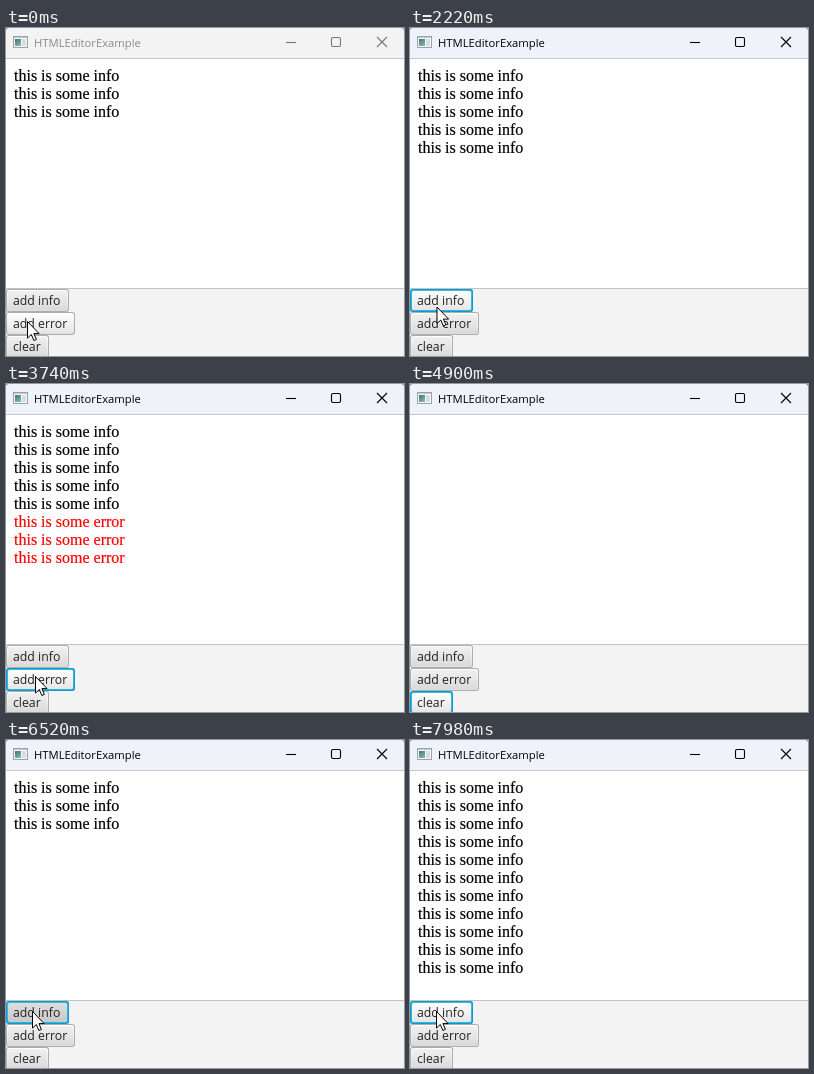
An HTML page for the animation above (8000 ms loop, 398 by 328 pixels).

```html
<!DOCTYPE html>
<html lang="en">
<head>
<meta charset="utf-8">
<title>HTMLEditorExample</title>
<style>
html, body { margin: 0; width: 100%; height: 100%; overflow: hidden; background: #f3f3f3; }
svg { display: block; }
.ui { font-family: "Open Sans", "Noto Sans", sans-serif; }
.page { font: 16px "Liberation Serif", "Times New Roman", serif; stroke-width: 0.2; }
</style>
</head>
<body>
<svg width="398" height="328" viewBox="0 0 398 328">
  <defs>
    <linearGradient id="normal" x2="0" y2="1"><stop stop-color="#f0f0f0"/><stop offset="1" stop-color="#dadada"/></linearGradient>
    <linearGradient id="hover" x2="0" y2="1"><stop stop-color="#fdfdfd"/><stop offset="1" stop-color="#e6e6e6"/></linearGradient>
    <linearGradient id="armed" x2="0" y2="1"><stop stop-color="#dedede"/><stop offset="1" stop-color="#c8c8c8"/></linearGradient>
    <linearGradient id="rim" x2="0" y2="1"><stop stop-color="#fff"/><stop offset="1" stop-color="#dedede"/></linearGradient>
    <linearGradient id="pane" x2="0.6" y2="1"><stop stop-color="#3f6f86"/><stop offset="1" stop-color="#7fb5a4"/></linearGradient>
  </defs>
  <rect width="398" height="40" fill="#6f78b4"/>
  <path id="bar" d="M0 31V3Q0 0 3 0H395Q398 0 398 3V31Z"/>
  <g>
    <rect x="7.5" y="8.5" width="14" height="11" fill="#f8f9fa" stroke="#9aa2a8"/>
    <path d="M8 9.5H21" stroke="#c3c9cd"/>
    <rect x="9" y="11" width="6" height="7" fill="url(#pane)"/>
    <rect x="16" y="11" width="4" height="7" fill="#d5dee2"/>
  </g>
  <text id="title" class="ui" x="28" y="19" font-size="11.25">HTMLEditorExample</text>
  <g id="controls" fill="none" stroke-width="1.1">
    <path d="M280 14.5H290"/>
    <rect x="325.5" y="9.5" width="9" height="9" rx="1.5"/>
    <path d="M371 9L381 19M381 9L371 19"/>
  </g>
  <rect y="30" width="398" height="230" fill="#fff"/>
  <path d="M0 30.5H398" stroke="#c6c8ce"/>
  <rect y="260" width="398" height="68" fill="#f3f3f3"/>
  <path d="M0 260.5H398" stroke="#c3c3c3"/>
  <g id="page" class="page"></g>
  <g id="buttons" class="ui" font-size="12.3" fill="#222"></g>
  <path id="cursor" d="M0 0V16.6L3.8 13L6.4 19L8.9 17.9L6.4 12.1H11.6Z" fill="#fff" stroke="#000" stroke-width="1" stroke-linejoin="round"/>
</svg>
<script>
const NS = 'http://www.w3.org/2000/svg';
const LOOP = 8000;
const $ = id => document.getElementById(id);

function add(parent, tag, attrs, text = '') {
  const node = document.createElementNS(NS, tag);
  set(node, attrs);
  node.textContent = text;
  return parent.appendChild(node);
}
function set(node, attrs) {
  for (const key in attrs) node.setAttribute(key, attrs[key]);
}

const INFO = 0, ERROR = 1, CLEAR = 2;
const buttons = [['add info', 63], ['add error', 69], ['clear', 43]].map(([label, width], i) => {
  const top = 261 + i * 23;
  const layer = (inset, rx, fill) => add($('buttons'), 'rect', {
    x: inset, y: top + inset, width: width - 2 * inset, height: 23 - 2 * inset, rx, fill
  });
  const edge = layer(0, 3, '#adadad');
  const ring = layer(0, 3, '#039ed3');
  const rim = layer(1, 2, 'url(#rim)');
  const face = layer(2, 1.5, 'url(#normal)');
  add($('buttons'), 'text', { x: 7, y: top + 16 }, label);
  return { top, edge, ring, rim, face };
});
const lines = Array.from({ length: 11 }, (_, i) =>
  add($('page'), 'text', { x: 8, y: 53 + i * 18 }));

const move = (x, y) => s => { s.x = x; s.y = y; };
const press = id => s => { s.armed = true; s.focus = id; };
const fire = id => s => {
  s.armed = false;
  s.focus = id;
  s.active = true;
  if (id === CLEAR) s.log = [];
  else s.log.push(id);
};
const tint = s => { s.bar = '#eff2f9'; };

// Each step changes the window state at a time in ms.
const steps = [
  [120, move(23, 286)], [270, move(25, 277)], [420, move(26.5, 271.5)],
  [1240, fire(INFO)], [1660, fire(INFO)], [1660, tint],
  [2090, move(26.5, 274)], [2220, move(27, 279)], [2350, move(28, 285)],
  [2480, move(29, 290)], [2600, move(29.5, 292.5)],
  [2880, fire(ERROR)], [3160, press(ERROR)], [3280, fire(ERROR)],
  [3590, press(ERROR)], [3740, fire(ERROR)],
  [3890, move(28, 303)], [4030, move(25, 318)], [4170, move(24.5, 326)], [4440, move(24.5, 329)],
  [4900, fire(CLEAR)],
  [5030, move(24.5, 318)], [5160, move(25, 299)], [5300, move(26, 279)], [5580, move(26.5, 271.5)],
  [5830, press(INFO)], [5980, fire(INFO)], [6115, press(INFO)], [6250, fire(INFO)],
  [6385, fire(INFO)], [6520, press(INFO)], [6670, fire(INFO)], [6795, fire(INFO)], [6920, fire(INFO)],
  [7070, press(INFO)], [7190, fire(INFO)], [7310, fire(INFO)],
  [7580, press(INFO)], [7710, fire(INFO)], [7850, fire(INFO)], [7980, fire(INFO)]
];

function stateAt(time) {
  const s = {
    x: 21.5, y: 293.5, log: [INFO, INFO, INFO],
    focus: -1, armed: false, active: false, bar: '#f3f3f3'
  };
  for (const [at, change] of steps) if (at <= time) change(s);
  return s;
}

function draw(time) {
  const s = stateAt(time);
  set($('bar'), { fill: s.bar });
  set($('title'), { fill: s.active ? '#000' : '#8a8a8a' });
  set($('controls'), { stroke: s.active ? '#000' : '#777' });
  lines.forEach((line, i) => {
    const kind = s.log[i];
    const ink = kind === ERROR ? '#f00' : '#000';
    line.textContent = kind === undefined ? '' : 'this is some ' + (kind === ERROR ? 'error' : 'info');
    set(line, { fill: ink, stroke: ink });
  });
  buttons.forEach((b, i) => {
    const focused = s.focus === i;
    const over = s.y >= b.top && s.y < b.top + 23 && (s.active || i === ERROR);
    set(b.ring, { opacity: focused ? 1 : 0 });
    set(b.rim, { opacity: focused ? 0.25 : 1 });
    set(b.face, { fill: `url(#${over ? s.armed ? 'armed' : 'hover' : 'normal'})` });
  });
  set($('cursor'), { transform: `translate(${s.x} ${s.y})` });
}

let start;
function tick(now) {
  start ??= now;
  draw((now - start) % LOOP);
  requestAnimationFrame(tick);
}
draw(0);
requestAnimationFrame(tick);
</script>
</body>
</html>
```
